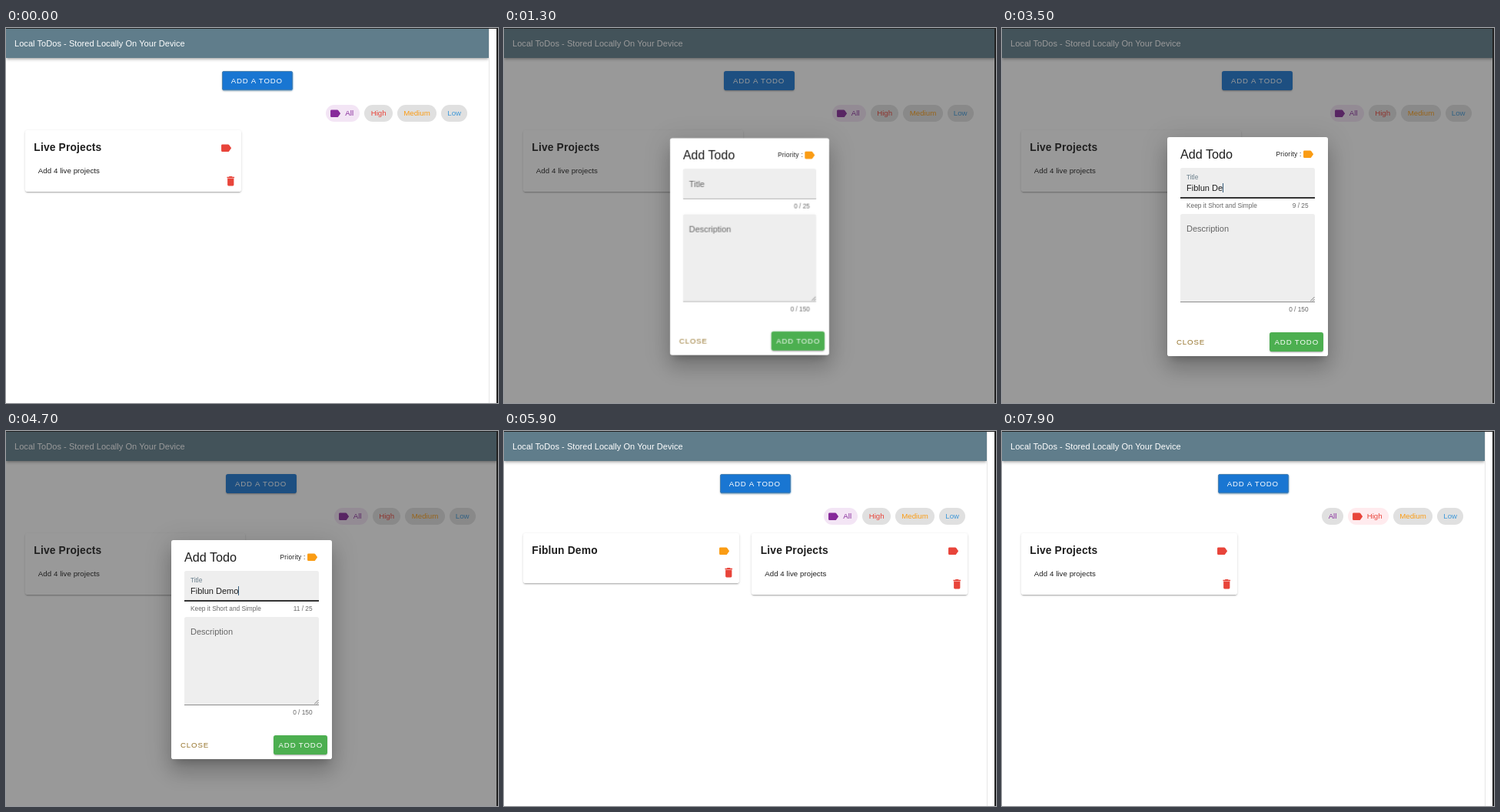
These frames come from a looping animation (640x488 px, 8 s). An HTML page:

```html
<!DOCTYPE html>
<html lang="en">
<head>
<meta charset="utf-8">
<title>Local ToDos</title>
<style>
html, body { margin: 0; width: 100%; height: 100%; overflow: hidden; background: #fff; }
body { font-family: "Liberation Sans", Arial, sans-serif; color: #1e1e1e; }
#stage { position: relative; width: 640px; height: 488px; overflow: hidden; }
#stage *, #stage { box-sizing: border-box; }
#stage div, #stage span, #stage svg, #stage i { position: absolute; }

/* Text is placed by its left edge and baseline. */
.t {
  left: calc(var(--x) * 1px); top: calc(var(--y) * 1px - .3465em);
  line-height: 0; white-space: pre; font-size: 11px;
}
.right { left: auto; right: calc(640px - var(--x) * 1px); }
.small { font-size: 8.3px; color: #666; }
.caps { font-size: 9.66px; letter-spacing: .0893em; }
.icon { width: 16.5px; height: 16.5px; fill: currentColor; }
.red { color: #e8443a; } .orange { color: #fa9c14; } .purple { color: #86299a; } .blue { color: #3f98d8; }
.wrap { inset: 0; }

/* --s is half the width gained when the scrollbar is hidden. */
.page { --s: 0px; animation: wide 8s step-end infinite; }
.bar {
  left: 0; top: 0; height: 39px; width: calc(628.3px + 2 * var(--s)); background: #607d8b; color: #fff;
  box-shadow: 0 1.4px 2.8px -.7px #0003, 0 2.8px 3.4px #00000024, 0 .7px 7px #0000001f;
}
.bar .t { letter-spacing: .055px; }
.btn {
  border-radius: 2.8px; color: #fff; height: 25px;
  box-shadow: 0 2px .7px -1.4px #0003, 0 1.4px 1.4px #00000024, 0 .7px 3.4px #0000001f;
}
.add { left: calc(280.7px + var(--s)); top: 55.6px; width: 92px; background: #1976d2; }
.glow, .ring { inset: 0; border-radius: inherit; }
.glow { background: #fff; opacity: 0; animation: glow 8s infinite; }
.ring { border: 1px solid #4a80ae; box-shadow: .5px .5px 1px #7fb9ea; animation: ring 8s step-end infinite; }

.chips { left: calc(2 * var(--s)); top: 100.4px; width: 600.4px; display: flex; justify-content: flex-end; gap: 6px; }
#stage .chips span {
  position: relative; height: 22px; padding: 0 8.3px; border-radius: 11px; background: #e0e0e0;
  font-size: 9.7px; line-height: 22px; flex: none;
}
#stage .chips .on { padding-left: 25px; }
.chips .icon { left: 4px; top: 2.8px; }
#stage .chips .on.purple { background: #f3e5f5; }
#stage .chips .on.red { background: #ffebee; }
.all { animation: until-filter 8s step-end infinite; }
.high { animation: from-filter 8s step-end infinite; }

.card {
  left: 24.8px; top: 133px; width: calc(281.2px + var(--s)); height: 79.8px; border-radius: 2.8px; background: #fff;
  box-shadow: 0 2px .7px -1.4px #0003, 0 1.4px 1.4px #00000024, 0 .7px 3.4px #0000001f;
}
.card .name { font-size: 13.8px; font-weight: bold; letter-spacing: .0125em; }
.card .note { font-size: 9.66px; letter-spacing: .0071em; }
.card .tag { right: 11.2px; top: 15px; }
.card .bin { right: 5.7px; bottom: 5px; }
.live { animation: live 8s step-end infinite; }
.demo { height: 64.8px; animation: demo 8s step-end infinite; }
.track { left: calc(628px + 2 * var(--s)); top: 1px; bottom: 0; width: 12px; background: #fff; border-left: 1px solid #e6e6e6; }

.shade { inset: 39px 0 0; background: #212121; opacity: 0; animation: shade 8s linear infinite; }
.shade.head { inset: 0 0 auto; height: 39px; animation-name: shade-head; }
.dialog { transform-origin: 319.2px 284px; opacity: 0; animation: dialog 8s infinite; }
.sheet {
  left: 215px; top: 141.5px; width: 208.6px; height: 285px; border-radius: 2.8px; background: #fff;
  box-shadow: 0 8px 10px -5px #0003, 0 17px 26px 2px #00000024, 0 6px 32px 6px #0000001f;
}
.field { left: 232px; width: 175px; background: #eee; border-bottom: 1px solid #8d8d8d; border-radius: 2.8px 2.8px 0 0; }
.line { left: 232px; top: 219.7px; width: 175px; height: 1.5px; background: #333; transform: scaleX(0); animation: line 8s infinite; }
.label { color: #666; transform-origin: 0 0; }
.title { animation: float 8s infinite; }
.hint { opacity: 0; animation: hint 8s infinite; }
.caret { width: 1px; height: 12px; margin-top: -6px; background: #345a78; animation: caret 8s step-end infinite; }
.edge-top { left: 0; top: 0; width: 100%; height: 1px; background: #222; }
.edge-right { right: 0; top: 0; width: 1.6px; height: 100%; background: #222; }

@keyframes wide { 0% { --s: 0px } 13% { --s: 5.25px } 59.7% { --s: 0px } }
@keyframes glow { 0%, 6% { opacity: 0 } 8.5% { opacity: .08 } 11% { opacity: .1 } 13% { opacity: .22 } 14.5% { opacity: .18 } 16%, 100% { opacity: 0 } }
@keyframes ring { 0% { visibility: visible } 15% { visibility: hidden } 63.5% { visibility: visible } }
@keyframes until-filter { 0% { visibility: visible } 85% { visibility: hidden } }
@keyframes from-filter { 0% { visibility: hidden } 85% { visibility: visible } }
@keyframes live { 0% { left: 24.8px } 59.7% { left: 322.2px } 85% { left: 24.8px } }
@keyframes demo { 0% { visibility: hidden } 59.7% { visibility: visible } 85% { visibility: hidden } }
@keyframes shade {
  0%, 13% { opacity: 0 } 13.75% { opacity: .13 } 15% { opacity: .38 } 16.25% { opacity: .46 }
  59.5% { opacity: .46 } 61.25% { opacity: .2 } 63.5%, 100% { opacity: 0 }
}
@keyframes shade-head {
  0%, 14% { opacity: 0 } 15% { opacity: .38 } 16.25% { opacity: .46 }
  59.5% { opacity: .46 } 61.25% { opacity: .2 } 63.5%, 100% { opacity: 0 }
}
@keyframes dialog {
  0%, 13.8% { opacity: 0; transform: scale(.5); animation-timing-function: linear }
  15% { opacity: .85; transform: scale(.9); animation-timing-function: linear }
  16.25% { opacity: 1; transform: scale(.99) }
  18.5%, 59.5% { opacity: 1; transform: none; animation-timing-function: ease-out }
  63%, 100% { opacity: 0; transform: scale(.5) }
}
@keyframes line { 0%, 23.5% { transform: scaleX(0) } 27.2%, 100% { transform: none } }
@keyframes float { 0%, 23.5% { transform: none; color: #666 } 27%, 100% { transform: translateY(-8.2px) scale(.75); color: #6b7f8c } }
@keyframes hint { 0%, 23.5% { opacity: 0 } 27%, 100% { opacity: 1 } }
@keyframes caret { 0% { opacity: 0 } 24% { opacity: 1 } 52.5% { opacity: 0 } 57.5% { opacity: 1 } }
</style>
</head>
<body>
<svg width="0" height="0" style="position:absolute">
  <symbol id="tag" viewBox="0 0 24 24"><path d="M17.63 5.84C17.27 5.33 16.67 5 16 5H5a2 2 0 0 0-2 2v10a2 2 0 0 0 2 2h11c.67 0 1.27-.34 1.63-.85L22 12z"/></symbol>
  <symbol id="bin" viewBox="0 0 24 24"><path d="M19 4h-3.5l-1-1h-5l-1 1H5v2h14zM6 19a2 2 0 0 0 2 2h8a2 2 0 0 0 2-2V7H6z"/></symbol>
</svg>

<div id="stage">
  <div class="wrap page">
    <div class="card live">
      <span class="t name" style="--x:11.5;--y:27.7">Live Projects</span>
      <span class="t note" style="--x:17;--y:56">Add 4 live projects</span>
      <svg class="icon tag red"><use href="#tag"/></svg>
      <svg class="icon bin red"><use href="#bin"/></svg>
    </div>
    <div class="card demo">
      <span class="t name" style="--x:11.5;--y:27.7">Fiblun Demo</span>
      <svg class="icon tag orange"><use href="#tag"/></svg>
      <svg class="icon bin red"><use href="#bin"/></svg>
    </div>

    <div class="btn add">
      <div class="ring"></div>
      <div class="glow"></div>
      <span class="t caps" style="--x:12;--y:16.5">ADD A TODO</span>
    </div>

    <div class="chips all">
      <span class="on purple"><svg class="icon"><use href="#tag"/></svg>All</span>
      <span class="red">High</span><span class="orange">Medium</span><span class="blue">Low</span>
    </div>
    <div class="chips high">
      <span class="purple">All</span>
      <span class="on red"><svg class="icon"><use href="#tag"/></svg>High</span>
      <span class="orange">Medium</span><span class="blue">Low</span>
    </div>

    <div class="bar"><span class="t" style="--x:11;--y:23.4">Local ToDos - Stored Locally On Your Device</span></div>
    <div class="track"></div>
  </div>

  <div class="shade"></div>
  <div class="shade head"></div>

  <div class="wrap dialog">
    <div class="sheet"></div>
    <span class="t" style="--x:232;--y:169.5;font-size:16.2px">Add Todo</span>
    <span class="t small" style="--x:356.5;--y:167;letter-spacing:.0333em;color:#1e1e1e">Priority :</span>
    <svg class="icon orange" style="left:390px;top:155.7px"><use href="#tag"/></svg>

    <div class="field" style="top:182px;height:39.5px"></div>
    <div class="line"></div>
    <span class="t label title" style="--x:240;--y:206">Title</span>
    <span class="t" style="--x:240;--y:212"><b id="typed" style="font-weight:normal"></b><i class="caret"></i></span>
    <span class="t small hint" style="--x:240;--y:233.5">Keep it Short and Simple</span>
    <span class="t small right" id="count" style="--x:398.5;--y:233.5">0 / 25</span>

    <div class="field" style="top:242px;height:114.5px"></div>
    <span class="t label" style="--x:240;--y:265">Description</span>
    <svg width="6" height="6" style="left:400.5px;top:349.5px" stroke="#666" stroke-width=".8"><path d="M0 5.5 5.5 0M3 5.5 5.5 3"/></svg>
    <span class="t small right" style="--x:398.5;--y:368.5">0 / 150</span>

    <span class="t caps" style="--x:227;--y:412;color:#96742c">CLOSE</span>
    <div class="btn" style="left:348px;top:396px;width:70px;background:#4caf50">
      <span class="t caps" style="--x:6.5;--y:16">ADD TODO</span>
    </div>
  </div>

  <div class="edge-top"></div>
  <div class="edge-right"></div>
</div>

<script>
const LOOP = 8000, TYPE_START = 2500, KEY_GAP = 120;
const TEXT = "Fiblun Demo";
const typed = document.getElementById("typed");
const count = document.getElementById("count");

function draw(now) {
  const keys = Math.floor((now % LOOP - TYPE_START) / KEY_GAP) + 1;
  const n = Math.max(0, Math.min(TEXT.length, keys));
  typed.textContent = TEXT.slice(0, n);
  count.textContent = `${n} / 25`;
  requestAnimationFrame(draw);
}
requestAnimationFrame(draw);
</script>
</body>
</html>
```
